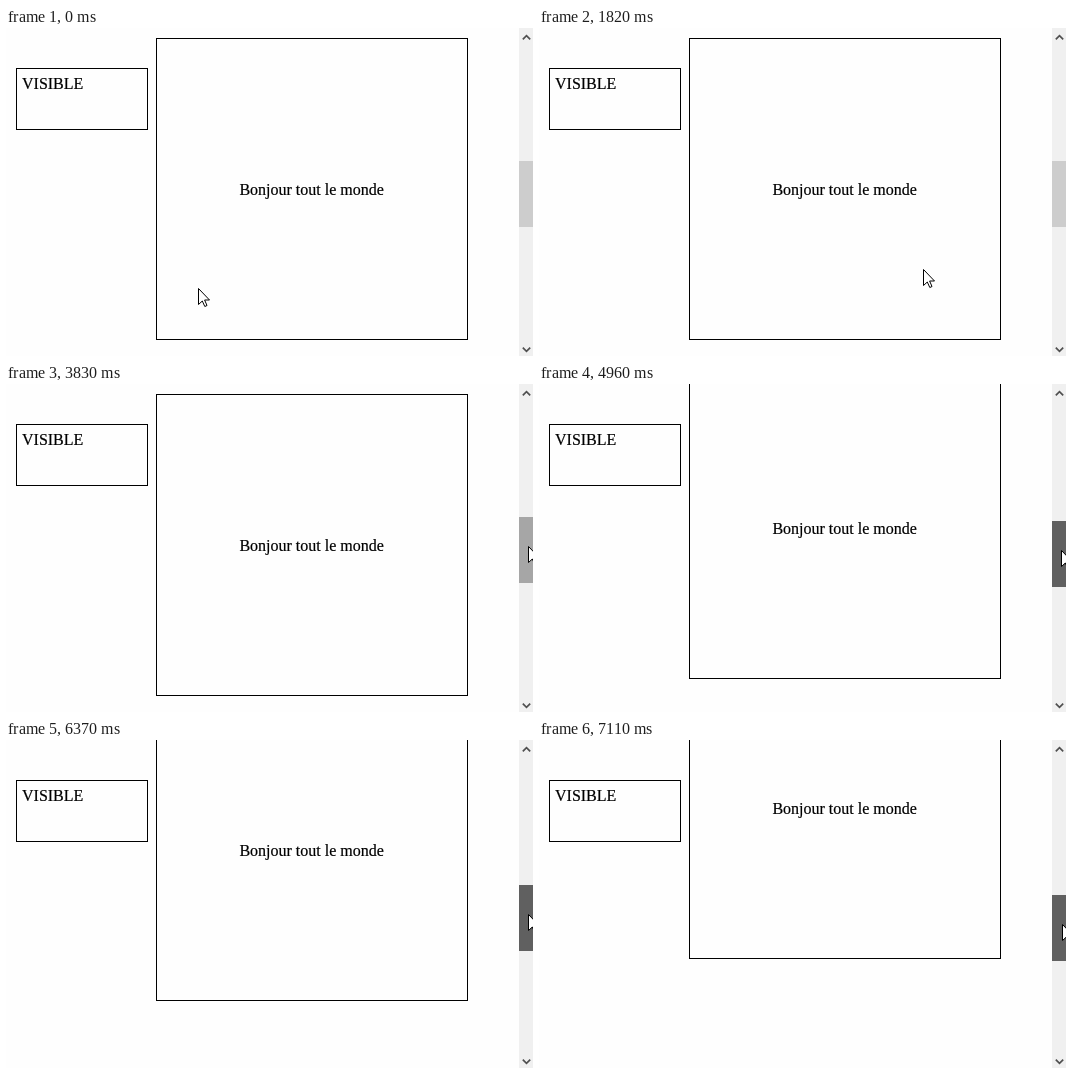
An HTML page that plays this animation: 527x328 px, repeating every 8000 ms.

```html
<!DOCTYPE html>
<html lang="fr">
<head>
<meta charset="utf-8">
<title>Défilement</title>
<style>
  html, body { margin: 0; width: 100%; height: 100%; overflow: hidden; background: #fefefe; }
  svg { display: block; }
  text { font: 16px "Liberation Serif", "Times New Roman", serif; stroke: #000; stroke-width: .2px; }
  .box { fill: none; stroke: #000; }
  .chevron { fill: none; stroke: #505050; stroke-width: 1.7; }
</style>
</head>
<body>
<svg width="527" height="328" viewBox="0 0 527 328">
  <rect class="box" x="10.5" y="40.5" width="131" height="61"/>
  <text x="16" y="61">VISIBLE</text>

  <g id="page">
    <rect class="box" x="150.5" y="10.5" width="311" height="301"/>
    <text x="233.4" y="167">Bonjour tout le monde</text>
  </g>

  <rect x="513" width="14" height="328" fill="#f0f0f0"/>
  <path class="chevron" d="M516.8 11.3 520.5 7.6 524.2 11.3M516.8 319.7 520.5 323.4 524.2 319.7"/>
  <rect id="thumb" x="513" y="133" width="14" height="66"/>

  <path id="cursor" d="M.5.5V16.5L4.3 13 6.8 18.5 9 17.5 6.6 12H11.5Z" fill="#fff" stroke="#000"/>
</svg>
<script>
  const LOOP = 8000;
  const PRESS = 3960;
  const PAGE_RATIO = 4.23; // page pixels per thumb pixel

  const linear = p => p;
  const easeOut = p => 1 - (1 - p) ** 1.48;

  // Each stroke moves the pointer in equal time steps; scroll is the thumb offset.
  const rest = { x: 192, y: 260, scroll: 0 };
  const strokes = [
    { start: 500, end: 1080, steps: 5, ease: easeOut, to: { x: 292, y: 254 } },
    { start: 1240, end: 1240, steps: 1, ease: linear, to: { x: 286, y: 256 } },
    { start: 1540, end: 1980, steps: 4, ease: easeOut, to: { x: 438, y: 233 } },
    { start: 2280, end: 2980, steps: 6, ease: easeOut, to: { x: 500, y: 189 } },
    { start: 3400, end: 3820, steps: 4, ease: easeOut, to: { x: 522, y: 162 } },
    { start: 4530, end: 5530, steps: 8, ease: linear, to: { scroll: 8 } },
    { start: 5660, end: 5820, steps: 2, ease: linear, to: { scroll: 11 } },
    { start: 6370, end: 7110, steps: 6, ease: linear, to: { x: 523, scroll: 22 } }
  ];

  const [page, thumb, cursor] = ["page", "thumb", "cursor"].map(id => document.getElementById(id));
  const place = (el, x, y) => el.setAttribute("transform", `translate(${x} ${y})`);

  function progress({ start, end, steps, ease }, t) {
    if (t >= end) return 1;
    const step = 1 + Math.floor((t - start) / (end - start) * (steps - 1));
    return ease(step / steps);
  }

  function poseAt(t) {
    const pose = { ...rest };
    for (const stroke of strokes) {
      if (t < stroke.start) break;
      const p = progress(stroke, t);
      for (const key in stroke.to) pose[key] += (stroke.to[key] - pose[key]) * p;
    }
    return pose;
  }

  function draw(t) {
    const pose = poseAt(t);
    const x = Math.round(pose.x);
    const y = Math.round(pose.y);
    const scroll = Math.floor(pose.scroll);
    place(page, 0, -Math.round(scroll * PAGE_RATIO));
    place(thumb, 0, scroll);
    place(cursor, x, y + scroll);
    thumb.setAttribute("fill", t >= PRESS ? "#606060" : x >= 513 ? "#a6a6a6" : "#cdcdcd");
  }

  const start = performance.now();
  function tick() {
    draw((performance.now() - start) % LOOP);
    requestAnimationFrame(tick);
  }
  tick();
</script>
</body>
</html>
```
